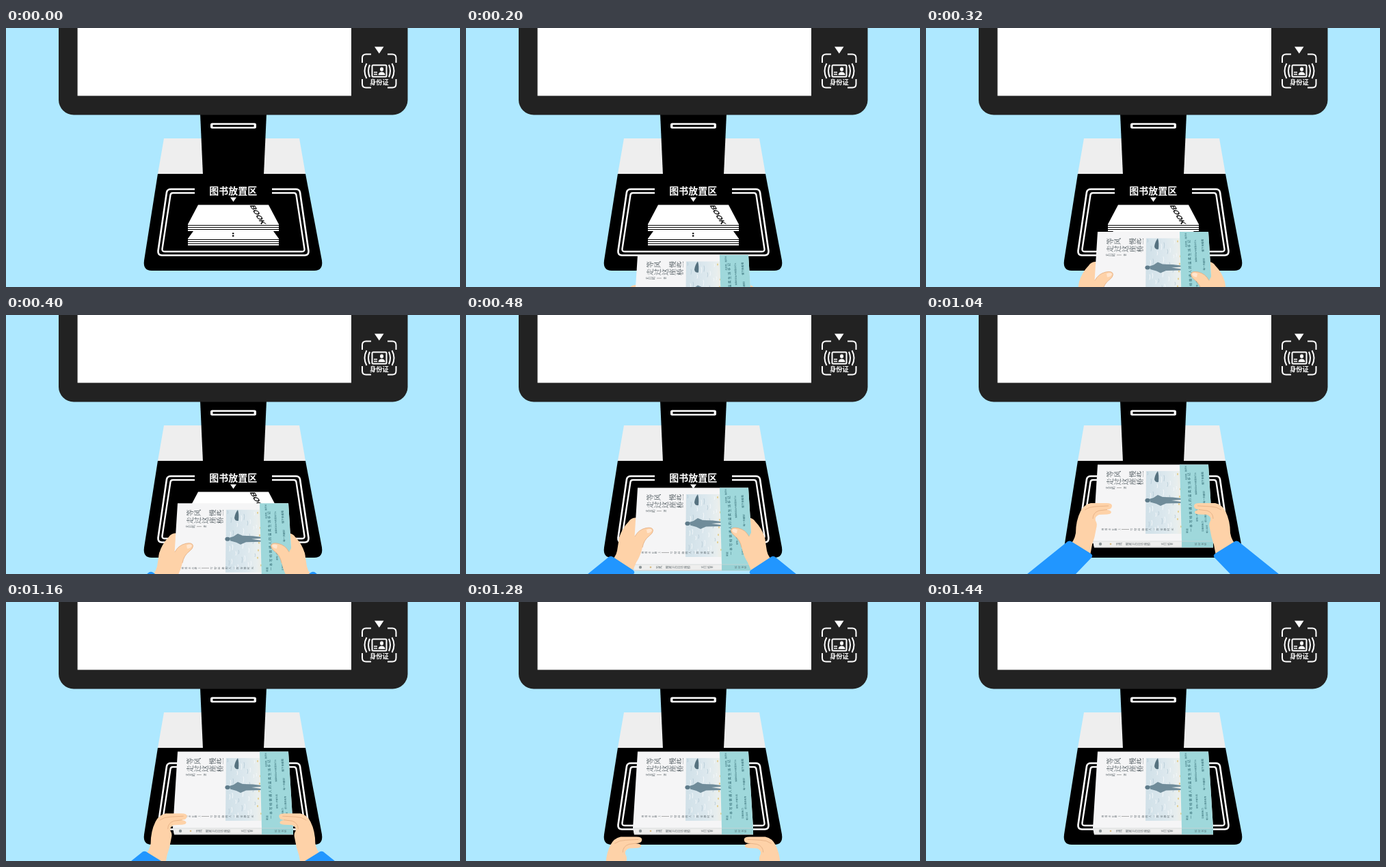
An HTML page with a canvas for the animation above (2.44 s loop, 664x380 px).

```html
<!DOCTYPE html>
<html lang="zh-CN">
<head>
<meta charset="utf-8">
<title>图书放置</title>
<style>
html, body { margin: 0; width: 100%; height: 100%; overflow: hidden; background: #aee8ff; }
canvas { display: block; width: 664px; height: 380px; }
</style>
</head>
<body>
<canvas id="stage" width="664" height="380"></canvas>
<script>
const ctx = document.getElementById('stage').getContext('2d');
const LOOP = 2440, STEP = 40, ARRIVE = 600, LEAVE = 1040, GONE = 1440;
const SANS = '"Noto Sans CJK SC", "Noto Sans CJK", sans-serif';
const SERIF = '"Noto Serif CJK SC", "Noto Sans CJK SC", "Noto Sans CJK", serif';
const SKIN = '#fed2a8', CREASE = '#e3ad80', BLUE = '#2196ff', INK = '#3a464c', TEAL = '#2b626b';

function poly(color, ...p) {
  ctx.fillStyle = color;
  ctx.beginPath();
  for (let i = 0; i < p.length; i += 2) ctx.lineTo(p[i], p[i + 1]);
  ctx.closePath();
  ctx.fill();
}

function box(color, x, y, w, h, r = 0) {
  ctx.fillStyle = color;
  ctx.beginPath();
  ctx.roundRect(x, y, w, h, r);
  ctx.fill();
}

function oval(color, x, y, rx, ry = rx) {
  ctx.fillStyle = color;
  ctx.beginPath();
  ctx.ellipse(x, y, rx, ry, 0, 0, Math.PI * 2);
  ctx.fill();
}

function shape(color, d) {
  ctx.fillStyle = color;
  ctx.fill(new Path2D(d));
}

function line(color, width, d) {
  ctx.strokeStyle = color;
  ctx.lineWidth = width;
  ctx.stroke(new Path2D(d));
}

function text(str, x, y, font, color, angle = 0, align = 'center') {
  ctx.save();
  ctx.translate(x, y);
  ctx.rotate(angle);
  ctx.font = font;
  ctx.fillStyle = color;
  ctx.textAlign = align;
  ctx.textBaseline = 'middle';
  ctx.fillText(str, 0, 0);
  ctx.restore();
}

function drawBadge() {
  const c = '#fff';
  poly(c, 539, 27.5, 552.5, 27.5, 545.8, 37.5);
  line(c, 2, 'M521 51V44Q521 38.5 526.5 38.5H534 M558 38.5H565Q570.5 38.5 570.5 44V51' +
    'M570.5 75V82Q570.5 87.5 565 87.5H558 M534 87.5H526.5Q521 87.5 521 82V75');
  line(c, 2, 'M532 54Q528 63 532 72 M527.5 52Q521.5 63 527.5 74' +
    'M560 54Q564 63 560 72 M564.5 52Q570.5 63 564.5 74');
  line(c, 2, 'M537 54.5H555Q556.5 54.5 556.5 56V70Q556.5 71.5 555 71.5H537Q535.5 71.5 535.5 70V56Q535.5 54.5 537 54.5Z');
  oval(c, 549.5, 60.5, 2.5, 3);
  shape(c, 'M544.5 69Q545 64.5 549.5 64.5Q554 64.5 554.5 69Z');
  line(c, 1.3, 'M538 65H543 M538 68H543');
  text('身份证', 545.8, 79.5, '900 9.2px ' + SANS, c);
}

function drawKiosk() {
  box('#aee8ff', 0, 0, 664, 380);
  poly('#eee', 231, 162, 429, 162, 438, 214, 222, 214);
  shape('#000', 'M222 214H438L462 341Q464 356 451 356H213Q200 356 202 341Z');
  poly('#000', 284, 126, 381, 126, 377, 215, 288, 215);
  box('#fff', 299, 139.5, 67, 8, 2.5);
  box('#000', 302.5, 142, 60, 3);
  box('#222', 77, -30, 510.5, 157.4, 22);
  box('#fff', 104.6, 0, 400.4, 99.6);
  drawBadge();
  line('#fff', 2.6, 'M276 236.5H241Q236 236.5 235 241L222.5 327Q222 333.5 228 333.5H437Q443 333.5 442.5 327L430 241Q429 236.5 424 236.5H389');
  line('#fff', 2.4, 'M276 242H244Q241 242 240.5 245L228.5 324Q228 328 232 328H433Q437 328 436.5 324L424.5 245Q424 242 421 242H389');
  text('图书放置区', 332.3, 239, 'bold 14px ' + SANS, '#fff');
  poly('#fff', 328, 248.5, 337, 248.5, 332.5, 255);
}

function drawPile() {
  poly('#fff', 274, 298, 391, 298, 399, 309, 266, 309);
  poly('#fff', 281, 259.5, 384, 259.5, 399, 288, 266, 288);
  for (const y of [288, 309]) {
    box('#fff', 266, y, 133, 10);
    for (let i = 0; i < 3; i++) box('#000', 266, y + 1 + i * 3, 133, 1.1);
  }
  box('#000', 331, 300.5, 2.4, 2);
  box('#000', 331, 304, 2.4, 2);
  ctx.save();
  ctx.transform(0.52, 0.86, -1, 0, 367.8, 274.2);
  text('BOOK', 0, 0, 'bold 11px "Liberation Sans", Arial, sans-serif', '#000');
  ctx.restore();
}

// The book lies on its side, so its lettering runs upwards or stands on end.
function sideways(str, x, y, size, spacing = 0) {
  ctx.letterSpacing = spacing + 'px';
  text(str, x, y, size + 'px ' + SANS, TEAL, -Math.PI / 2 - 0.04, 'left');
  ctx.letterSpacing = '0px';
}

function onEnd(str, x, y, pitch, size) {
  [...str].forEach((c, i) => text(c, x + i * pitch, y, size + 'px ' + SERIF, INK, -Math.PI / 2));
}

function drawSea() {
  const g = ctx.createLinearGradient(321, 0, 375, 0);
  g.addColorStop(0, '#d0e0e8');
  g.addColorStop(0.55, '#dce8ee');
  g.addColorStop(0.85, '#e8eeee');
  g.addColorStop(1, '#f0eee3');
  poly(g, 322, 229, 371, 229, 373, 321, 321, 321);
  for (let i = 0; i < 34; i++) {
    const x = 324 + (i * 17 % 43), y = 230 + (i * 37 % 82);
    line(i % 3 ? '#f5f9fb' : '#b8ccd7', 0.9, `M${x} ${y}q1.5 3 0 ${5 + i % 5}`);
  }
  for (let i = 0; i < 8; i++) box('#e3cf91', 367 + i * 5 % 6, 232 + i * 11, 2, 3, 1);
  shape('#55717f', 'M334 241Q335 234 339 229Q341 235 340 245Q335 246 334 241Z');
  shape('#708c9a', 'M327 270L333 268L339 264L346 267L361 267.5L373 269V271L359 272L373 274V276L351 276.5L343 280L337 277L328 274.5Z');
  oval('#5d7a89', 324, 272, 3.6, 3);
}

function drawBook() {
  poly('#d8d9d9', 244, 331, 420, 331, 420, 341.5, 246, 341.5);
  poly('#f5f5f6', 251, 219.5, 413, 219.5, 420, 332, 244, 332);
  poly('#eeeeed', 244, 332, 420, 332, 420, 339.5, 246, 340);
  drawSea();
  poly('#9fd8db', 371, 219.5, 413, 219.5, 420, 332, 374, 332);
  poly('#98d2d5', 374, 332, 420, 332, 420, 341, 374, 341);
  line('#cfd3d3', 0.7, 'M244 332H420');

  onEnd('等风', 269, 233.5, 11.2, 10);
  onEnd('慢些', 302, 233.5, 11.2, 10);
  onEnd('走过这座桥', 269, 244.5, 11, 10);
  onEnd('禾川屿', 265.5, 253.5, 4.6, 4.3);
  line('#777', 0.6, 'M279 253.5H286');
  onEnd('著', 291, 253.5, 4, 4);
  onEnd('慢慢走在路上', 259, 314.5, 4.8, 3.4);
  line('#777', 0.6, 'M286 314.5H297');
  onEnd('写给赶路的人一段安静时光', 301, 314.5, 5.4, 3.8);

  sideways('一本写给普通人的温柔生活手记', 388, 318, 4.9, 1.4);
  sideways('风会停，路还长', 380.5, 242, 3);
  sideways('清晨的站台与夜里的灯火', 395, 264, 3);
  sideways('愿每一步都从容', 396.5, 303, 3);
  sideways('慢下来看看', 405, 249, 3.8);
  sideways('每一天都好', 407, 276, 3.6);
  sideways('把心事说给海', 409, 304, 3.2);
  sideways('平静而有力', 405, 318, 3.2);
  sideways('暖心读本', 411, 320, 3);
  sideways('新版', 382, 320, 3.4);

  oval('#8d9698', 255, 336, 2.2);
  oval('#d8bb83', 270, 336, 1.3);
  onEnd('等风', 280, 336, 4.6, 4.2);
  onEnd('慢些走过这座桥', 294, 336, 5.2, 4.4);
  onEnd('禾川屿著', 346, 336, 4.6, 4);
  onEnd('远岸书坊', 395, 336, 4.6, 3.8);
}

// Draws a left-hand part and its mirror image.
function both(sum, dx, draw) {
  for (const flip of [false, true]) {
    ctx.save();
    if (flip) ctx.transform(-1, 0, 0, 1, sum, 0);
    ctx.translate(dx, 0);
    draw();
    ctx.restore();
  }
}

function gripBack() {
  shape(SKIN, 'M256 263.5H247Q241 264 238 269Q228 279 224 293L222 314H256Z');
}

function gripFront() {
  shape(SKIN, 'M224 293Q228 281 240 278L247 291Q252 281 263 278.5Q273 276.5 273.5 282Q273.5 286 268 290Q260 296 258 307Q255 320 249 329L240 350L210 328Q219 322 221 312Z');
  line(CREASE, 0.8, 'M247 291Q252 281 263 278.5Q273 276.5 273.5 282Q273.5 286 268 290Q260 296 258 307');
  shape('#ffe6d0', 'M264 281Q271 278 272 282Q270 286 265 286Z');
  shape(BLUE, 'M136 380L207 322.5Q211 318.5 215 321L244 340Q248 343 245 346L213 380L180 410H98Z');
}

function openHand() {
  shape(SKIN, 'M219 320Q219 302 226 288Q231 278 241 276L264 276Q272 276 272 280Q272 285 265 285.5L259 286Q269 285 271 289Q271 292 265 292.5L253 293Q246 296 248 302Q251 306 249 313Q247 326 243 337L239 358L208 340Q217 332 219 320Z');
  line(CREASE, 0.8, 'M232 286Q239 281 248 281L267 280 M265 285.5L253 287Q244 290 244 299');
  shape(BLUE, 'M148 380L205 334Q209 330 213 332.5L241 350Q245 353 242 356L219 380L187 412H108Z');
}

function shifted(dy, draw) {
  ctx.save();
  ctx.translate(0, dy);
  draw();
  ctx.restore();
}

function render(t) {
  t = Math.floor(t / STEP) * STEP;
  drawKiosk();
  drawPile();
  if (t === 0) return;

  if (t < LEAVE) {
    const dy = Math.max(0, ARRIVE - t) / STEP * 11.36;
    shifted(dy, () => {
      both(661, 0, gripBack);
      drawBook();
      both(661, 0, gripFront);
    });
    return;
  }

  drawBook();
  if (t < GONE) {
    const n = (t - LEAVE) / STEP;
    shifted(n * 11.4, () => both(664, n * -2.45, openHand));
  }
}

function tick() {
  render(performance.now() % LOOP);
  requestAnimationFrame(tick);
}
tick();
</script>
</body>
</html>
```
